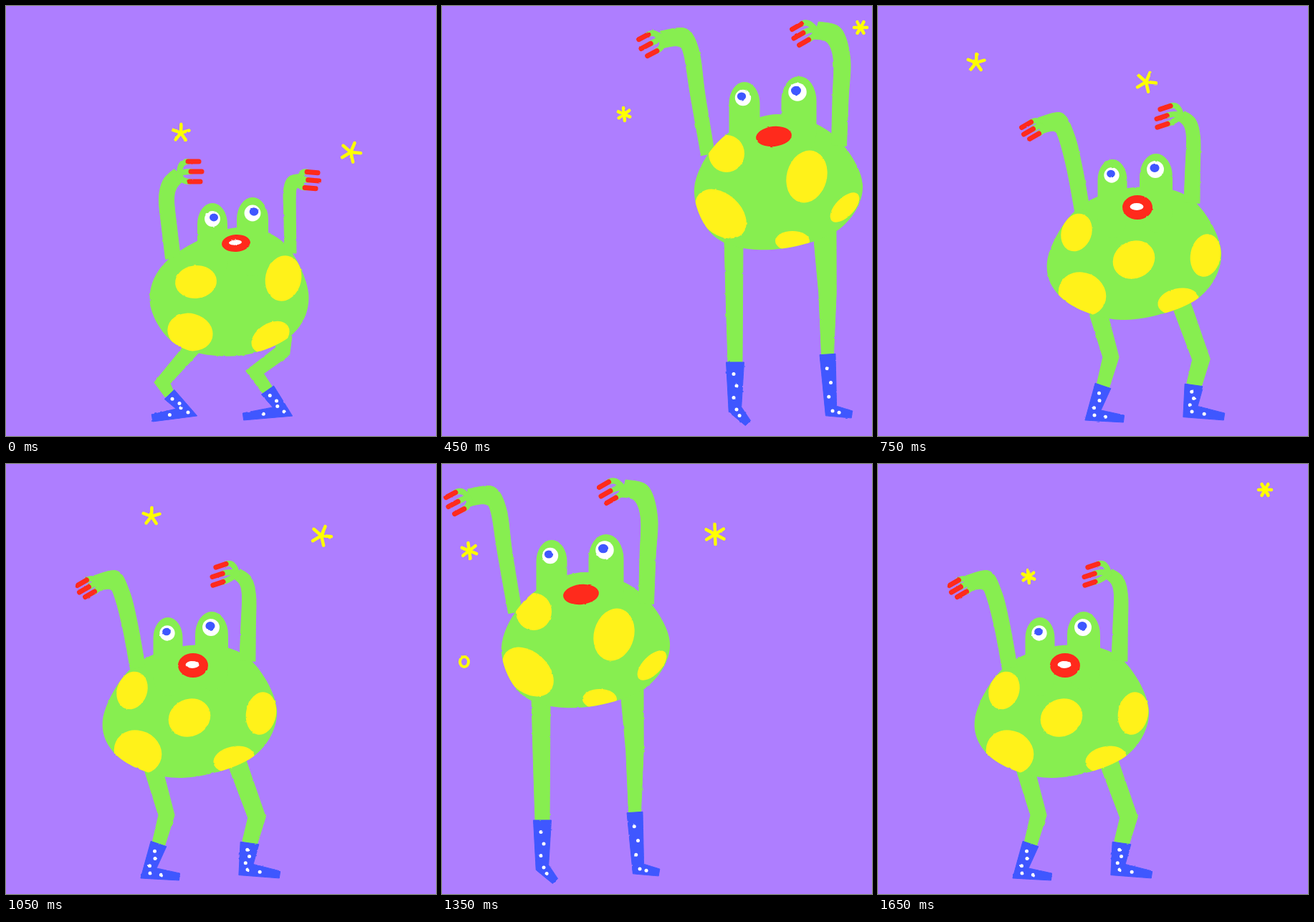
Animation of 600 by 600 pixels, one loop 1800 ms. Source, as an HTML page:

```html
<!DOCTYPE html>
<html lang="en">
<head>
<meta charset="utf-8">
<title>Dancing frog</title>
<style>
  html, body { margin: 0; width: 100%; height: 100%; overflow: hidden; background: #ae7eff; }
  svg { display: block; width: 100%; height: 100%; }
</style>
</head>
<body>
<svg viewBox="0 0 600 600">
  <filter id="crayon" filterUnits="userSpaceOnUse" x="0" y="0" width="600" height="600" color-interpolation-filters="sRGB">
    <feTurbulence type="fractalNoise" baseFrequency=".14" numOctaves="2" seed="4"/>
    <feDisplacementMap in="SourceGraphic" scale="2" xChannelSelector="R" yChannelSelector="G"/>
  </filter>
  <g id="scene" filter="url(#crayon)"></g>
</svg>
<script>
const GREEN = '#87ee50', YELLOW = '#fff21a', RED = '#ff2a1c', BLUE = '#3f57ff', WHITE = '#fff', STAR = '#ffff00';
const STEP = 150;
const scene = document.getElementById('scene');

// line: key points of a body outline or of a limb's middle, w: width at both ends
// hand: first and last fingertip, finger angle; boot: heel and toe
// stalks: middle, top, width; ovals: x, y, rx, ry, angle
const poses = {
  crouchRight: {
    body: '315,310 385,328 422,400 400,458 325,488 240,474 201,415 225,355',
    arms: [{ line: '233,352 228,310 224,270 229,248 242,235', w: [21, 21], hand: [272, 217, 274, 245, 0] },
           { line: '397,345 396,290 396,258 401,246 414,243', w: [16, 18], hand: [438, 233, 435, 255, 5] }],
    legs: [{ line: '262,475 218,526 228,542', w: [22, 14], boot: '252,567 204,575' },
           { line: '388,460 386,482 347,511 365,536', w: [22, 16], boot: '386,566 331,573' }],
    stalks: [[288, 275, 42], [344, 267, 44]],
    gaze: [2, -2],
    lips: [321, 331, 20, 12, -4], smile: true,
    spots: [[265, 385, 29, 23, -6], [387, 380, 25, 32, 12], [257, 455, 32, 26, 15], [369, 462, 29, 19, -32]]
  },
  tallRight: {
    body: '393,181 472,207 511,275 478,337 390,371 305,351 276,285 312,216',
    arms: [{ line: '303,230 295,140 293,70 300,42 318,31', w: [24, 24], hand: [340, 16, 350, 43, 4] },
           { line: '470,215 473,130 475,65 481,46 500,36', w: [22, 22], hand: [526, 20, 537, 44, 2] }],
    legs: [{ line: '325,350 328,440 332,510', w: [26, 20], boot: '337,568 306,574' },
           { line: '464,340 471,430 474,509', w: [34, 16], boot: '478,567 443,574' }],
    stalks: [[351, 122, 45], [424, 117, 47]],
    gaze: [0, -1],
    lips: [392, 213, 39, 14, -5], smile: true,
    spots: [[339, 267, 31, 26, 10], [471, 261, 24, 32, 10], [326, 346, 36, 25, 22], [449, 340, 39, 23, -26]]
  },
  tallLeft: {
    body: '467,151 545,179 587,250 552,313 460,340 382,323 352,255 390,185',
    arms: [{ line: '371,207 357,125 348,65 335,44 306,47', w: [19, 24], hand: [272, 48, 284, 71, 152] },
           { line: '554,195 556,130 558,75 547,41 522,34', w: [21, 25], hand: [486, 34, 496, 56, 150] }],
    legs: [{ line: '407,328 408,420 409,497', w: [26, 20], boot: '409,563 427,582' },
           { line: '534,315 538,400 538,486', w: [32, 17], boot: '543,565 572,570' }],
    stalks: [[422, 106, 43], [498, 98, 49]],
    gaze: [-2, -2],
    lips: [463, 182, 25, 14, -6], smile: false,
    spots: [[397, 206, 25, 26, 0], [509, 238, 28, 37, 15], [389, 290, 41, 28, 42], [489, 328, 24, 14, 0], [562, 281, 26, 13, -46]]
  },
  crouchLeft: {
    body: '358,253 436,268 479,343 445,409 345,438 262,412 236,357 278,283',
    arms: [{ line: '285,285 274,225 263,182 251,162 226,167', w: [21, 23], hand: [198, 171, 209, 187, 150] },
           { line: '438,275 439,230 440,185 435,163 423,153', w: [22, 16], hand: [391, 145, 387, 170, 162] }],
    legs: [{ line: '305,420 325,490 314,530', w: [25, 18], boot: '300,571 343,576' },
           { line: '421,410 451,493 441,529', w: [26, 21], boot: '436,566 483,573' }],
    stalks: [[327, 214, 41], [388, 206, 46]],
    gaze: [-1, -2],
    lips: [362, 281, 21, 17, 0], smile: true,
    spots: [[277, 316, 21, 27, 20], [357, 354, 30, 26, -25], [457, 348, 21, 30, 10], [285, 402, 34, 30, 25], [419, 412, 29, 18, -12]]
  }
};

// Each star: x, y, radius, rays, first angle
const starSets = {
  wide: { stars: [[244, 177, 12, 5, -88], [481, 204, 14, 5, -67]] },
  small: { stars: [[227, 162, 9, 6, -96], [557, 41, 9, 6, -120]] },
  ring: { stars: [[38, 121, 11, 6, -38], [381, 98, 14, 6, -92]], ring: [31, 276, 6, 7, 0] }
};

// pose, dx, dy, stars, dx, dy
const beats = [
  ['crouchRight', 0, 0, 'wide', 0, 0],
  ['crouchLeft', -5, 3, 'ring', 103, 6],
  ['tallRight', 0, 0, 'small', 0, 0],
  ['tallLeft', 0, 0, 'small', 27, -11],
  ['tallRight', 42, 0, 'ring', 183, 0],
  ['crouchLeft', 0, 0, 'wide', -107, -98],
  ['crouchRight', -5, 0, 'ring', 85, 0],
  ['crouchLeft', -101, 0, 'wide', -41, -104],
  ['tallRight', -165, 0, 'small', -161, 0],
  ['tallLeft', -269, 0, 'ring', 0, 0],
  ['tallRight', -165, 0, 'wide', -196, -80],
  ['crouchLeft', -101, 0, 'small', -17, -5]
];

const points = s => s.split(' ').map(p => p.split(',').map(Number));
const mix = (a, b, t) => a.map((v, i) => v + (b[i] - v) * t);
const move = ([x, y], [dx, dy], d) => [x + dx * d, y + dy * d];
const unit = deg => [Math.cos(deg * Math.PI / 180), Math.sin(deg * Math.PI / 180)];

function add(parent, tag, attrs) {
  const el = document.createElementNS('http://www.w3.org/2000/svg', tag);
  for (const k in attrs) el.setAttribute(k, attrs[k]);
  return parent.appendChild(el);
}

const oval = (g, [cx, cy, rx, ry, angle = 0], attrs) =>
  add(g, 'ellipse', { cx, cy, rx, ry, transform: `rotate(${angle} ${cx} ${cy})`, ...attrs });
const stroke = (g, d, color, width) =>
  add(g, 'path', { d, fill: 'none', stroke: color, 'stroke-width': width, 'stroke-linecap': 'round' });

// Spline through points; bend 0 gives straight sides
function spline(p, closed, bend = 1 / 6) {
  const n = p.length;
  const at = i => closed ? p[(i + n) % n] : p[Math.max(0, Math.min(n - 1, i))];
  let d = `${p[0]}`;
  for (let i = 0; i < (closed ? n : n - 1); i++) {
    const [a, b, c, e] = [-1, 0, 1, 2].map(k => at(i + k));
    d += `C${b.map((v, k) => v + (c[k] - a[k]) * bend)} ${c.map((v, k) => v - (e[k] - b[k]) * bend)} ${c}`;
  }
  return d;
}

// Tapered band around a middle line, mitred at its joints
function limb(g, p, [w0, w1], fill, bend) {
  const normal = i => {
    const a = Math.atan2(p[i + 1][1] - p[i][1], p[i + 1][0] - p[i][0]);
    return [-Math.sin(a), Math.cos(a)];
  };
  const last = p.length - 1, sides = [[], []];
  p.forEach((q, i) => {
    const a = normal(Math.max(0, i - 1)), b = normal(Math.min(last - 1, i));
    const half = (w0 + (w1 - w0) * i / last) / 2;
    const miter = half / (1 + a[0] * b[0] + a[1] * b[1]);
    const n = [a[0] + b[0], a[1] + b[1]];
    sides[0].push(move(q, n, miter));
    sides[1].unshift(move(q, n, -miter));
  });
  const d = `M${spline(sides[0], false, bend)}L${spline(sides[1], false, bend)}Z`;
  add(g, 'path', { d, fill, stroke: fill, 'stroke-linejoin': 'round' });
}

function drawHand(g, palm, [x0, y0, x1, y1, angle]) {
  const dir = unit(angle);
  [0, 0.5, 1].forEach(t => {
    const tip = move(mix([x0, y0], [x1, y1], t), dir, t === 0.5 ? 0 : -3);
    const base = move(tip, dir, -15);
    stroke(g, `M${palm}Q${move(base, dir, -12)} ${base}`, GREEN, 8);
    stroke(g, `M${base}L${tip}`, RED, 7);
  });
}

function drawLeg(g, leg) {
  const line = points(leg.line), cuff = line[line.length - 1], [heel, toe] = points(leg.boot);
  limb(g, line, leg.w, GREEN, 0);
  limb(g, [cuff, heel, toe], [leg.w[1] + 5, 10], BLUE, 0);
  const dots = [0.25, 0.5, 0.75, 1].map(t => mix(cuff, heel, t)).concat([mix(heel, toe, 0.45)]);
  dots.forEach(([cx, cy], i) => add(g, 'circle', { cx: cx + (i % 2 ? 2 : -2), cy, r: 2.5, fill: WHITE }));
}

function drawEye(g, [x, top, width], gaze) {
  const r = width * 0.26, eye = [x + Math.min(0, gaze[0]), top + 22];
  oval(g, [...eye, r, r], { fill: WHITE });
  oval(g, [...move(eye, gaze, 1), r * 0.55, r * 0.5], { fill: BLUE });
}

function buildFrog(f, name) {
  const g = add(scene, 'g', { display: 'none' });
  const outline = `M${spline(points(f.body), true)}Z`;
  f.legs.forEach(leg => drawLeg(g, leg));
  add(g, 'path', { d: outline, fill: GREEN });
  f.arms.forEach(arm => {
    const line = points(arm.line);
    limb(g, line, arm.w, GREEN);
    drawHand(g, line[line.length - 1], arm.hand);
  });
  f.stalks.forEach(([x, y, width]) =>
    add(g, 'rect', { x: x - width / 2, y, width, height: 110, rx: width / 2, ry: width * 0.7, fill: GREEN }));
  add(add(g, 'clipPath', { id: name }), 'path', { d: outline });
  const spots = add(g, 'g', { 'clip-path': `url(#${name})` });
  f.spots.forEach(s => oval(spots, s, { fill: YELLOW }));
  f.stalks.forEach(s => drawEye(g, s, f.gaze));
  oval(g, f.lips, { fill: RED });
  const [x, y, rx, ry, angle] = f.lips;
  if (f.smile) oval(g, [x - 1, y - 1, rx * 0.45, ry * 0.3, angle], { fill: WHITE });
  return g;
}

function buildStars({ stars, ring }) {
  const g = add(scene, 'g', { display: 'none' });
  stars.forEach(([x, y, r, rays, first]) => {
    for (let i = 0; i < rays; i++)
      stroke(g, `M${x},${y}L${move([x, y], unit(first + i * 360 / rays), r)}`, STAR, 4.5);
  });
  if (ring) oval(g, ring, { fill: 'none', stroke: STAR, 'stroke-width': 4 });
  return g;
}

const nodes = {};
for (const k in poses) nodes[k] = buildFrog(poses[k], k);
for (const k in starSets) nodes[k] = buildStars(starSets[k]);

function place(name, x, y) {
  nodes[name].setAttribute('display', 'inline');
  nodes[name].setAttribute('transform', `translate(${x} ${y})`);
}

let shown = -1;
function draw(ms) {
  const i = Math.floor(ms / STEP) % beats.length;
  if (i === shown) return;
  shown = i;
  for (const k in nodes) nodes[k].setAttribute('display', 'none');
  const [pose, x, y, stars, sx, sy] = beats[i];
  place(pose, x, y);
  place(stars, sx, sy);
}

const start = performance.now();
function tick() {
  draw(performance.now() - start);
  requestAnimationFrame(tick);
}
tick();
</script>
</body>
</html>
```
